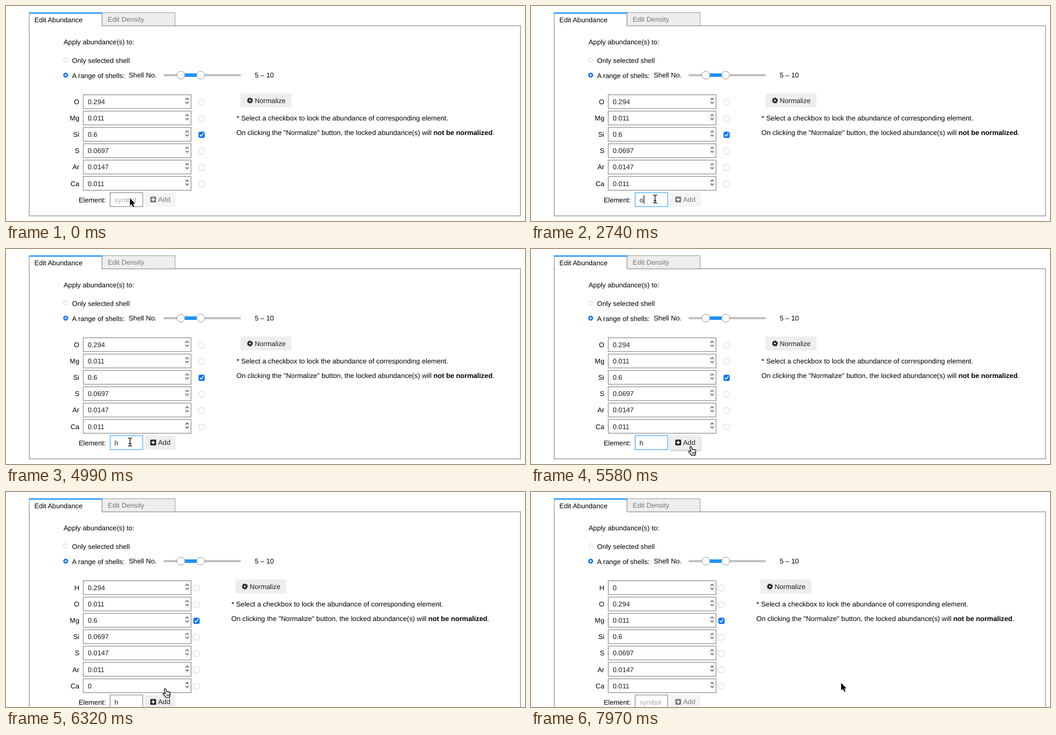
Recreate the animation shown at these times as an HTML page. Size 892 px wide and 370 px high, loop 8000 ms.

```html
<!DOCTYPE html>
<html lang="en">
<head>
<meta charset="utf-8">
<title>Abundance editor</title>
<style>
  html, body { margin: 0; width: 100%; height: 100%; overflow: hidden; background: #fff; }
  svg { display: block; font: 11.8px "Liberation Sans", Arial, sans-serif; text-rendering: geometricPrecision; }
  text { fill: #000; white-space: pre; }
  .label { text-anchor: end; }
  .value, .btn text { fill: #202020; }
  .note { font-size: 11.86px; }
  .field { fill: #fff; stroke: #9e9e9e; stroke-width: 1.4; }
  .field.focus { stroke: #64b5f6; }
  .hint { fill: #a8a8a8; }
  .btn rect { fill: #eee; }
  .btn .icon { fill: #202020; }
  .btn.off { opacity: .6; }
  .btn.hover .face, .btn.down .face { filter: drop-shadow(0 1.5px 1.5px rgba(0, 0, 0, .35)); }
  .btn.down .face { fill: #bdbdbd; }
  .check { fill: #fff; stroke: #d8d8d8; }
  .check.on { fill: #0b76f6; stroke: #0b76f6; }
  .line { fill: none; stroke-linecap: round; stroke-linejoin: round; }
  .accent { fill: #1e93f8; }
</style>
</head>
<body>
<svg id="stage" width="892" height="370" viewBox="0 0 892 370">
  <defs>
    <path id="arrow" d="M0 0V12.9L2.9 10.2L5.3 15.3L7.5 14.4L5.2 9.5H9.2Z"
      fill="#000" stroke="#fff" stroke-width="1.6" paint-order="stroke" stroke-linejoin="round"/>
    <path id="beamLine" d="M-3-7Q-.6-7 0-5.8Q.6-7 3-7M0-6V6M-3 7Q-.6 7 0 5.8Q.6 7 3 7M-1.8 2.6H1.8"/>
    <g id="beam" class="line">
      <use href="#beamLine" stroke="#fff" stroke-width="3"/>
      <use href="#beamLine" stroke="#000" stroke-width="1.2"/>
    </g>
    <g id="hand" class="line" stroke="#000">
      <path fill="#fff" stroke-width="1.2" d="M5 9.8L3.3 3.2Q2.8 1 4.3.8Q5.6.6 6.1 2.3L7.3 6.3Q8.2 5.3 9.2 6.2Q10.2 5.3 11.1 6.4Q12.6 6 12.9 7.6Q13.6 10.5 12.6 13L12 16.2H6Q4.5 13 2 11.4Q.2 9.6 1.4 8.7Q2.8 8 5 9.8Z"/>
      <path d="M7.4 10.5V13.5M9.3 10.5V13.5M11.1 10.5V13.5" stroke-width=".8"/>
    </g>
  </defs>

  <rect id="panel" x="40" y="34" width="844.3" height="327.2" fill="#fff" stroke="#9e9e9e" stroke-width="1.4"/>
  <rect x="165" y="11.5" width="125.5" height="22.5" fill="#eee" stroke="#9e9e9e"/>
  <rect x="40" y="11" width="125" height="24.5" fill="#fff"/>
  <path d="M40 11V36M165 11V34" stroke="#9e9e9e" stroke-width="1.2"/>
  <rect class="accent" x="39.5" y="11" width="126" height="2.2"/>
  <text x="48.8" y="27.5">Edit Abundance</text>
  <text x="174.8" y="27.3" style="fill:#777">Edit Density</text>

  <text x="99" y="65.8">Apply abundance(s) to:</text>
  <circle cx="102.6" cy="92.7" r="3.7" fill="#fff" stroke="#d8d8d8"/>
  <text x="113.5" y="97.6">Only selected shell</text>
  <circle cx="102.6" cy="119" r="4.2" fill="#0b76f6"/>
  <circle cx="102.6" cy="119" r="1.7" fill="#fff"/>
  <text x="113.5" y="123.5">A range of shells:</text>
  <text x="211" y="123.3">Shell No.</text>
  <rect x="271" y="117.2" width="132.5" height="3.6" fill="#bdbdbd"/>
  <rect class="accent" x="300" y="116" width="34" height="6"/>
  <g fill="#fff" stroke="#9e9e9e"><circle cx="300.5" cy="119" r="6.8"/><circle cx="334.5" cy="119" r="6.8"/></g>
  <text x="427.5" y="123.3">5 – 10</text>

  <g id="rows"></g>

  <g id="side">
    <g class="btn">
      <rect x="403" y="150.5" width="87.5" height="24"/>
      <g fill="none" stroke="#202020">
        <circle cx="419.3" cy="162.6" r="2.9" stroke-width="2.5"/>
        <circle cx="419.3" cy="162.6" r="4.4" stroke-width="1.6" pathLength="16" stroke-dasharray="1 1"/>
      </g>
      <text x="427.5" y="166.8">Normalize</text>
    </g>
    <text class="note" x="396.3" y="197">* Select a checkbox to lock the abundance of corresponding element.</text>
    <text class="note" x="396" y="221.7">On clicking the "Normalize" button, the locked abundance(s) will <tspan font-weight="bold">not be normalized</tspan>.</text>
  </g>

  <g id="foot">
    <text class="label" x="171.5" y="337.7">Element:</text>
    <rect id="field" class="field" x="179" y="321.2" width="56" height="24"/>
    <text id="entry" x="186.6" y="337.7"></text>
    <path id="caret" d="M0 326V340.5" stroke="#000" stroke-width="1.1"/>
    <g id="add" class="btn">
      <rect class="face" x="239" y="321" width="52.5" height="24.5"/>
      <rect class="icon" x="248" y="328" width="10" height="10" rx="1.6"/>
      <path d="M250 333H256M253 330V336" stroke="#fff" stroke-width="1.8"/>
      <text x="261.5" y="337.2">Add</text>
    </g>
    <g id="warn">
      <path d="M300 330.8L306 336.8M306 330.8L300 336.8" stroke="#f00a0a" stroke-width="2.6"/>
      <text x="314.5" y="337.7">Already exists!</text>
    </g>
  </g>
  <use id="cursor"/>
</svg>
<script>
const LOOP = 8000, PITCH = 28.13;
const SYMBOLS = ["O", "Mg", "Si", "S", "Ar", "Ca"];
const VALUES = ["0.294", "0.011", "0.6", "0.0697", "0.0147", "0.011"];
const $ = id => document.getElementById(id);

// Each step changes part of the state and holds until the next one.
const at = (cur, x, y) => ({ cur, x, y });
const STEPS = [
  [0, { text: "", caret: false, focus: false, add: "off", warn: false, grown: false, shifted: 0, ...at("arrow", 213, 330.8) }],
  [500, at("beam", 213.2, 332.2)],
  [950, { focus: true, caret: true }],
  [1400, { caret: false }],
  [1850, { caret: true }],
  [2450, { caret: false }],
  [2740, { text: "o", caret: true }],
  [3340, { caret: false, warn: true }],
  [3790, { caret: true }],
  [4090, { text: "" }],
  [4390, { text: "h", warn: false, add: "on" }],
  [4990, { caret: false }],
  [5140, at("beam", 222, 334)],
  [5290, at("arrow", 238, 343)],
  [5440, { add: "hover", ...at("hand", 262, 343) }],
  [5580, at("hand", 270, 339)],
  [5870, { caret: true }],
  [6170, { caret: false, focus: false, add: "down" }],
  [6320, { grown: true, add: "on", ...at("hand", 269, 337.8) }],
  [6620, { shifted: 3 }],
  [6770, { shifted: 7 }],
  [6920, { text: "", add: "off" }],
  [7220, at("beam", 292, 338)],
  [7370, at("arrow", 342, 337)],
  [7520, at("arrow", 408, 331)],
  [7670, at("arrow", 469.5, 325.5)],
  [7970, at("arrow", 533, 328.4)]
];

const rowMarkup = i => `
  <g transform="translate(0 ${i * PITCH})">
    <text class="label" x="126" y="168.9"></text>
    <rect class="field" x="132.8" y="152.7" width="185.2" height="23.8"/>
    <text class="value" x="140.5" y="168.9"></text>
    <rect x="306.5" y="155.5" width="9.5" height="15.5" rx="3" fill="#f3f3f3"/>
    <path class="line" d="M309.1 161L311.3 158.7L313.5 161M309.1 165.3L311.3 167.6L313.5 165.3" stroke="#444" stroke-width="1.1"/>
    <g class="lock">
      <rect class="check${i === 2 ? " on" : ""}" x="331.3" y="160.6" width="9.8" height="9.8" rx="2"/>
      ${i === 2 ? '<path class="line" d="M333.6 165.8L335.5 167.8L338.9 162.9" stroke="#fff" stroke-width="1.5"/>' : ""}
    </g>
  </g>`;
$("rows").innerHTML = Array.from({ length: 7 }, (_, i) => rowMarkup(i)).join("");

const rows = [...$("rows").children].map(node => ({
  node,
  symbol: node.querySelector(".label"),
  value: node.querySelector(".value"),
  lock: node.querySelector(".lock")
}));

const show = (node, on) => node.setAttribute("visibility", on ? "visible" : "hidden");
const move = (node, x, y) => node.setAttribute("transform", `translate(${x} ${y})`);

function draw(s) {
  const symbols = s.grown ? ["H", ...SYMBOLS] : SYMBOLS;
  const before = [...VALUES, "0"], after = ["0", ...VALUES];
  const dx = s.grown ? -8.8 : 0, dy = s.grown ? PITCH : 0;
  rows.forEach((row, i) => {
    show(row.node, i < symbols.length);
    row.symbol.textContent = symbols[i] || "";
    row.value.textContent = (i < s.shifted ? after : before)[i];
    move(row.lock, dx, 0);
  });
  move($("side"), dx, 0);
  move($("foot"), 0, dy);
  $("panel").setAttribute("height", 327.2 + dy);
  $("field").setAttribute("class", s.focus ? "field focus" : "field");
  $("entry").textContent = s.text || "symbol";
  $("entry").setAttribute("class", s.text ? "value" : "hint");
  show($("caret"), s.caret);
  move($("caret"), s.text ? 194.2 : 187.5, 0);
  $("add").setAttribute("class", "btn " + s.add);
  show($("warn"), s.warn);
  $("cursor").setAttribute("href", "#" + s.cur);
  move($("cursor"), s.x, s.y);
}

let last = -1;
function tick() {
  const t = performance.now() % LOOP;
  const done = STEPS.filter(([start]) => start <= t);
  if (done.length !== last) {
    last = done.length;
    draw(Object.assign({}, ...done.map(([, change]) => change)));
  }
  requestAnimationFrame(tick);
}
tick();
</script>
</body>
</html>
```
